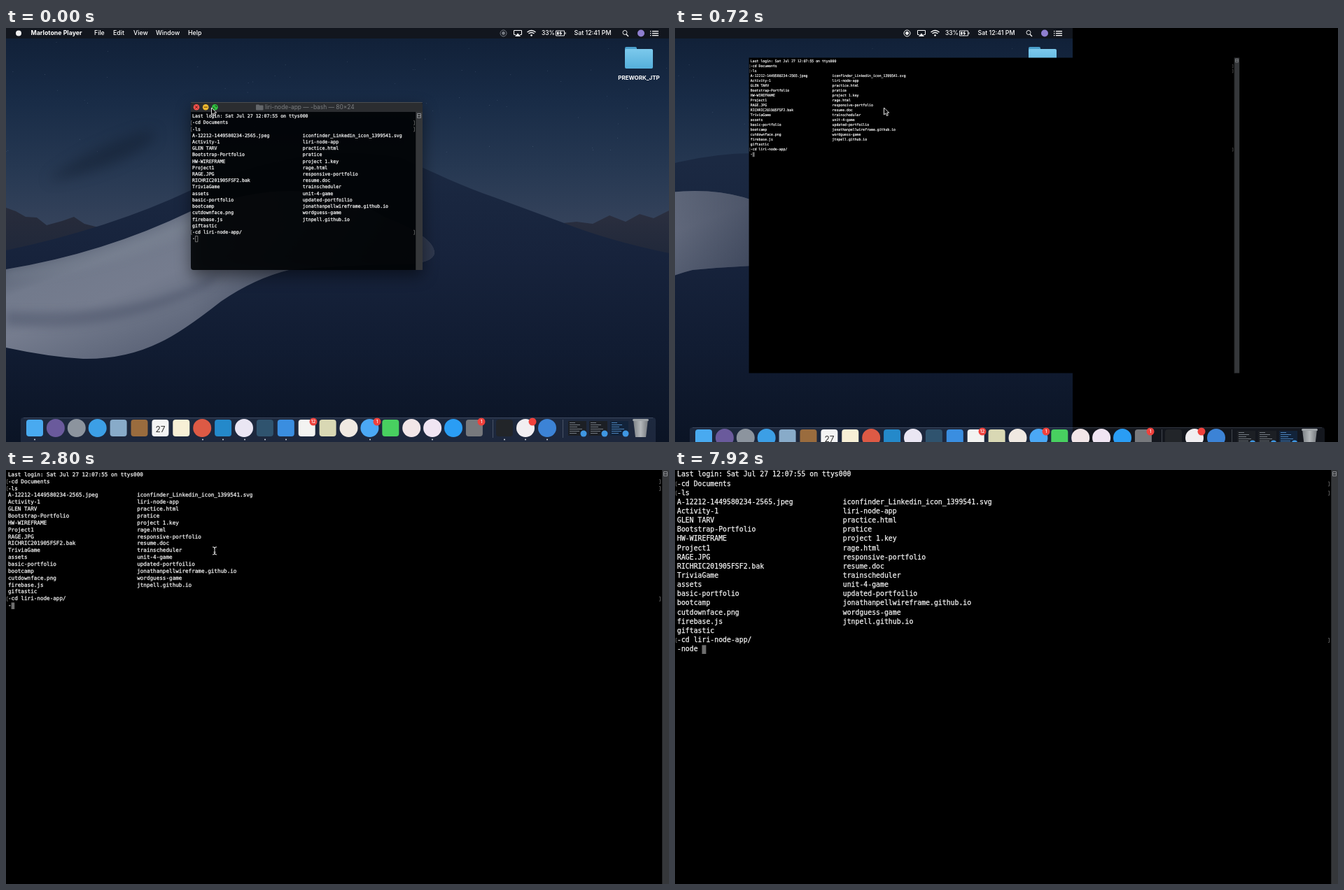
Recreate the animation shown at these times as an HTML page with a canvas. Size 947x592 px, loop 8000 ms.

```html
<!DOCTYPE html>
<html lang="en">
<head>
<meta charset="utf-8">
<title>Terminal going full screen</title>
<style>
html, body { margin: 0; width: 100%; height: 100%; overflow: hidden; background: #000; }
canvas { display: block; }
</style>
</head>
<body>
<canvas id="stage" width="947" height="592"></canvas>
<script>
const W = 947, H = 592, LOOP = 8000, STEP = 80;
const PX = W / 1440; // screen points to stage pixels
const MONO = '"DejaVu Sans Mono", monospace';
const SANS = 'Inter, "Open Sans", sans-serif';
const stage = document.getElementById('stage').getContext('2d');
let c = stage;

const LEFT = ['A-12212-1449580234-2565.jpeg', 'Activity-1', 'GLEN TARV', 'Bootstrap-Portfolio',
  'HW-WIREFRAME', 'Project1', 'RAGE.JPG', 'RICHRIC201905FSF2.bak', 'TriviaGame', 'assets',
  'basic-portfolio', 'bootcamp', 'cutdownface.png', 'firebase.js', 'giftastic'];
const RIGHT = ['iconfinder_Linkedin_icon_1399541.svg', 'liri-node-app', 'practice.html', 'pratice',
  'project 1.key', 'rage.html', 'responsive-portfolio', 'resume.doc', 'trainscheduler',
  'unit-4-game', 'updated-portfoilio', 'jonathanpellwireframe.github.io', 'wordguess-game',
  'jtnpell.github.io'];

// time, value
const GROW = [[320, 0], [400, .015], [480, .05], [560, .14], [640, .298], [720, .6], [800, .87], [880, .9765], [960, 1]];
const SLIDE = [[400, 0], [480, .01], [560, .04], [640, .112], [720, .4], [800, .78], [880, .956], [960, 1]];
const DOCK_DROP = [[480, 0], [560, 1], [640, 4], [720, 14], [800, 26], [880, 34], [960, 42]];
// time, character width, line height
const ZOOM = [[0, 6, 14], [2800, 7, 15], [3040, 8, 16], [3280, 8, 17], [3680, 9, 19], [3920, 9, 20]];
const TYPED = 'node ', TYPE_START = 6160, TYPE_GAP = 160;

function at(table, t) {
  if (t <= table[0][0]) return table[0][1];
  for (let i = 1; i < table.length; i++) {
    const [a, u] = table[i - 1], [b, v] = table[i];
    if (t <= b) return u + (v - u) * (t - a) / (b - a);
  }
  return table[table.length - 1][1];
}

function rect(x, y, w, h, fill, r = 0) {
  c.fillStyle = fill;
  c.beginPath();
  c.roundRect(x, y, w, h, r);
  c.fill();
}

function disc(x, y, r, fill) {
  c.fillStyle = fill;
  c.beginPath();
  c.arc(x, y, r, 0, 7);
  c.fill();
}

function label(s, x, y, font, fill = '#fff', align = 'left') {
  c.font = font;
  c.fillStyle = fill;
  c.textAlign = align;
  c.textBaseline = 'middle';
  c.fillText(s, x, y);
}

function shape(d, fill) {
  c.fillStyle = fill;
  c.fill(new Path2D(d));
}

function line(d, color, width = 1) {
  c.strokeStyle = color;
  c.lineWidth = width;
  c.stroke(new Path2D(d));
}

function grad(x0, y0, x1, y1, ...stops) {
  const g = c.createLinearGradient(x0, y0, x1, y1);
  stops.forEach((s, i) => g.addColorStop(i / (stops.length - 1), s));
  return g;
}

function layer(w, h, paint) {
  const cv = document.createElement('canvas');
  cv.width = w;
  cv.height = h;
  c = cv.getContext('2d');
  paint();
  c = stage;
  return cv;
}

function wallpaper() {
  rect(0, 0, W, H, grad(0, 0, 0, 300, '#101f36', '#182b46', '#263852', '#38455d'));
  let seed = 7;
  const rnd = () => (seed = seed * 16807 % 2147483647) / 2147483647;
  for (let i = 0; i < 60; i++) disc(rnd() * W, 20 + rnd() * 170, .45, 'rgba(190,205,230,.35)');
  c.filter = 'blur(9px)';
  shape('M60 218Q110 175 190 150Q225 140 205 165Q150 205 60 218Z', 'rgba(18,30,48,.5)');
  c.filter = 'none';
  shape('M0 257L14 262L28 270L44 271L58 282L80 276L97 270L112 280L140 287L170 300V340H0Z', grad(0, 257, 0, 320, '#282c3b', '#20283a'));
  shape('M770 285L795 279L815 277L838 280L862 268L885 277L905 266L925 272L947 261V340H770Z', grad(0, 262, 0, 325, '#2b2f3f', '#20283a'));
  shape('M0 318Q150 286 264 232Q430 160 565 186C610 206 650 226 700 243L792 277Q860 304 947 322V592H0Z',
    grad(0, 190, 0, 592, '#1b2942', '#17233c', '#111c32', '#0b1425'));
  c.save();
  c.clip(new Path2D('M0 345Q140 322 264 262Q430 200 540 270Q612 298 612 322Q610 336 570 338Q490 338 404 346Q355 358 307 391Q250 436 219 450Q170 474 110 473Q60 470 0 457Z'));
  rect(0, 200, 640, 290, grad(120, 280, 200, 480, '#4d566a', '#727a8c', '#757c8e', '#676f82', '#596175'));
  c.filter = 'blur(6px)';
  shape('M0 345Q150 322 290 255L300 275Q170 345 0 362Z', 'rgba(130,138,154,.3)');
  shape('M0 425Q150 440 290 370L310 345Q200 415 0 405Z', 'rgba(60,70,92,.35)');
  c.filter = 'none';
  rect(260, 200, 380, 290, grad(260, 0, 600, 0, 'rgba(24,34,56,0)', 'rgba(24,34,56,.65)'));
  c.restore();
  rect(884, 27, 17, 10, '#4a9fcb', 2);
  rect(884, 30, 40, 28, grad(0, 30, 0, 58, '#7cc9ec', '#55afdb'), 2);
  label('PREWORK_JTP', 904, 72, '700 8px ' + SANS, '#fff', 'center');
}

function menuBar(names, xs, recording) {
  rect(0, 0, W, 15, '#12161e');
  disc(18, 7.5, 4, '#f0f0f0');
  names.forEach((s, i) => label(s, xs[i], 7.5, (i ? '500' : '700') + ' 8.8px ' + SANS));
  const dim = recording ? '#fff' : '#777c84';
  c.strokeStyle = dim;
  c.lineWidth = 1;
  c.beginPath();
  c.arc(710.5, 7.5, 4.5, 0, 7);
  c.stroke();
  disc(710.5, 7.5, 2.4, dim);
  line('M728 9.5H725.5V3.5H736.5V9.5H734', '#fff');
  shape('M731 7.5L735 12H727Z', '#fff');
  line('M744.5 6Q750.5 1 756.5 6M746.5 8Q750.5 5 754.5 8', '#fff', 1.4);
  disc(750.5, 10.5, 1.3, '#fff');
  label('33%', 765, 7.5, '500 8.4px ' + SANS);
  line('M785.5 4H797.5V11H785.5ZM799 6V9', '#fff', .9);
  rect(787, 5.5, 2.5, 4, '#fff');
  shape('M793 3.5L790 8H792L791 11.5L794.5 7H792.5Z', '#fff');
  label('Sat 12:41 PM', 811.5, 7.5, '500 8.8px ' + SANS);
  c.beginPath();
  c.arc(884, 6.5, 3, 0, 7);
  c.strokeStyle = '#fff';
  c.stroke();
  line('M886 9L889 12', '#fff', 1.2);
  disc(907, 7.5, 5, '#8f7fd0');
  for (let y = 4; y < 12; y += 3) rect(920, y, 1.4, 1.3, '#fff'), rect(923, y, 9, 1.3, '#fff');
}

function dock() {
  rect(21, 1, 907, 40, 'rgba(112,130,165,.18)', 4);
  line('M25 1.5H924', 'rgba(180,195,220,.2)');
  // "o" marks round icons
  const icons = ['#49aaf0', 'o#6a5a9c', 'o#8c949e', 'o#3c9fe6', '#88abc9', '#9a6c3e', '#f4f4f4', '#f7f0d6',
    'o#dd5a45', '#2489ca', 'o#eae6f3', '#2f536e', '#3a8ee0', '#f3f3f1', '#d9d8b4', 'o#f0e9e2',
    'o#4ba8f5', '#48d060', 'o#f2e6e8', 'o#f0e5f3', 'o#2a9df4', '#77797d'];
  const icon = (k, x) => k[0] === 'o' ? disc(x, 16, 13, k.slice(1)) : rect(x - 12, 4, 24, 24, k, 4);
  icons.forEach((k, i) => icon(k, 41 + i * 29.9));
  label('27', 220.5, 18, '400 12px ' + SANS, '#333', 'center');
  icon('#222529', 712);
  icon('o#f1eef1', 742);
  icon('o#3c83d6', 773);
  rect(695, 4, 1, 26, 'rgba(200,210,225,.25)');
  rect(795, 4, 1, 26, 'rgba(200,210,225,.25)');
  [816, 846, 876].forEach((x, i) => {
    rect(x - 13, 6, 26, 21, i === 2 ? '#12233a' : '#1c1f24');
    for (let k = 0; k < 6; k++) rect(x - 11, 8 + k * 3, 8 + k * 7 % 11, 1, i === 2 ? '#4b83bb' : '#737a82');
    disc(x + 9, 24, 4.5, '#3f97e2');
  });
  shape('M896 4H917L914 29H899Z', grad(896, 0, 917, 0, '#7d8287', '#b3b7ba', '#75797e'));
  rect(895, 3, 23, 3, '#9ea3a7', 1.5);
  [[439, '12'], [530, '1'], [679, '1'], [752, '']].forEach(([x, n]) => {
    disc(x, 7, 5.5, '#f0413c');
    label(n, x, 7.3, '500 6.5px ' + SANS, '#fff', 'center');
  });
  for (const x of [41, 281, 310, 341, 370, 400, 520, 609, 712, 742, 773]) disc(x, 32.5, 1, '#d5dae2');
}

// x, y: left edge and middle of the first line
function shell(x, y, adv, pitch, edge, typed, hollow) {
  const font = adv / .602 + 'px ' + MONO;
  c.strokeStyle = '#f4f4f4';
  c.lineWidth = .25;
  const put = (s, row, col = 0) => {
    label(s, x + col * adv, y + row * pitch, font, '#f4f4f4');
    c.strokeText(s, x + col * adv, y + row * pitch);
  };
  put('Last login: Sat Jul 27 12:07:55 on ttys000', 0);
  put('-cd Documents', 1);
  put('-ls', 2);
  LEFT.forEach((s, i) => put(s, i + 3));
  RIGHT.forEach((s, i) => put(s, i + 3, 40));
  put('-cd liri-node-app/', 18);
  put('-' + typed, 19);
  for (const row of [1, 2, 18]) {
    const top = y + row * pitch - 3;
    line(`M${x} ${top}h-1.5v6h1.5M${edge - 1.5} ${top}h1.5v6h-1.5`, '#6a6a6a', .8);
  }
  const cx = x + (1 + typed.length) * adv, cy = y + 19 * pitch - pitch * .48;
  if (hollow) line(`M${cx + .5} ${cy + .5}h${adv - .5}v${pitch - 1}h${.5 - adv}z`, '#8c8c8c', .8);
  else rect(cx, cy, adv, pitch * .96, '#6e6e6e');
}

function scrollBar(x, y, h) {
  rect(x, y, 10, h, '#35373a');
  rect(x, y, 1, h, '#27292b');
  line(`M${x + 2.5} ${y + 2.5}h5v6h-5zM${x + 2.5} ${y + 5.5}h5`, '#a0a3a6', .8);
}

function fullScreen(t) {
  const [, adv, pitch] = ZOOM.filter(z => z[0] <= t).pop();
  const n = Math.max(0, Math.floor((t - TYPE_START) / TYPE_GAP) + 1);
  shell(3, 6.8, adv * PX, pitch * PX, 934.5, TYPED.slice(0, n), false);
  scrollBar(937, 0, H);
}

function smallWindow(active) {
  c.save();
  c.shadowColor = 'rgba(0,0,0,.55)';
  c.shadowBlur = 22;
  c.shadowOffsetY = 8;
  rect(0, 0, 331, 240, 'rgba(2,4,6,.9)', 4);
  c.restore();
  rect(0, 0, 331, 14, '#2b2d30', [4, 4, 0, 0]);
  rect(0, 0, 331, .8, '#55585b', 2);
  [['#f9524d', 'M-2-2L2 2M2-2L-2 2'], ['#eeb92f', 'M-2.5 0H2.5'], ['#2fc343', 'M-2 0V2H0M0-2H2V0']].forEach(([k, d], i) => {
    const x = 8 + i * 13.2;
    disc(x, 7.2, 4.3, k);
    c.save();
    c.translate(x, 7.2);
    line(d, 'rgba(40,10,0,.75)', 1);
    c.restore();
  });
  const tone = active ? '#3fa0dc' : '#64676a';
  rect(93, 3.5, 5, 3, tone, 1);
  rect(93, 4.5, 10.5, 7, tone, 1);
  label('liri-node-app — -bash — 80×24', 106, 7.5, '400 8.4px ' + SANS, active ? '#a0a0a0' : '#7c7f82');
  shell(2, 20.5, 6 * PX, 14 * PX, 319.5, '', !active);
  scrollBar(321, 14, 226);
}

function arrow(x, y) {
  c.save();
  c.translate(x, y);
  const d = 'M0 0V10L2.4 7.9L4 11.5L5.8 10.7L4.2 7.2H7.2Z';
  shape(d, '#000');
  line(d, '#fff', .9);
  c.restore();
}

function beam(x, y) {
  const d = `M${x - 3} ${y - 5.5}Q${x} ${y - 5.5} ${x} ${y - 3}V${y + 3}Q${x} ${y + 5.5} ${x - 3} ${y + 5.5}` +
    `M${x + 3} ${y - 5.5}Q${x} ${y - 5.5} ${x} ${y - 3}M${x} ${y + 3}Q${x} ${y + 5.5} ${x + 3} ${y + 5.5}M${x - 1.5} ${y + 2}H${x + 1.5}`;
  line(d, '#d8d8d8', 1.1);
}

const desk = layer(W, H, wallpaper);
const idleBar = layer(W, 15, () => menuBar(['Marlotone Player', 'File', 'Edit', 'View', 'Window', 'Help'], [35.5, 126, 153, 182, 214, 260], false));
const activeBar = layer(W, 15, () => menuBar(['Terminal', 'Shell', 'Edit', 'View', 'Window', 'Help'], [35.5, 86, 119, 148, 181, 226], true));
const dockBar = layer(W, 42, dock);

function opening(t) {
  const p = at(GROW, t), active = t >= 240;
  const dx = -Math.round(W * at(SLIDE, t));
  c.drawImage(desk, dx, 0);
  c.drawImage(active ? activeBar : idleBar, dx, 0);
  const w = 331 + 616 * p, h = 240 + 352 * p, old = Math.max(0, 1 - 2.4 * p);
  c.save();
  c.translate(264 * (1 - p), 106 * (1 - p));
  if (old > 0) {
    c.save();
    c.scale(w / 331, h / 240);
    smallWindow(active);
    c.restore();
  }
  if (p > 0) {
    rect(0, 0, w, h, `rgba(0,0,0,${1 - old})`);
    c.globalAlpha = Math.min(1, p * 4);
    c.scale(w / W, h / H);
    fullScreen(t);
  }
  c.restore();
  c.drawImage(dockBar, 0, 556 + at(DOCK_DROP, t));
}

function draw(t) {
  rect(0, 0, W, H, '#000');
  if (t < 960) opening(t);
  else fullScreen(t);
  if (t < 1680) arrow(t < 80 ? 293.5 : 298.5, 114);
  else if (t < TYPE_START) beam(298, 115.5);
}

const start = performance.now();
let shown = -1;
function tick() {
  const t = Math.floor((performance.now() - start) % LOOP / STEP) * STEP;
  if (t !== shown) draw(shown = t);
  requestAnimationFrame(tick);
}
tick();
</script>
</body>
</html>
```
